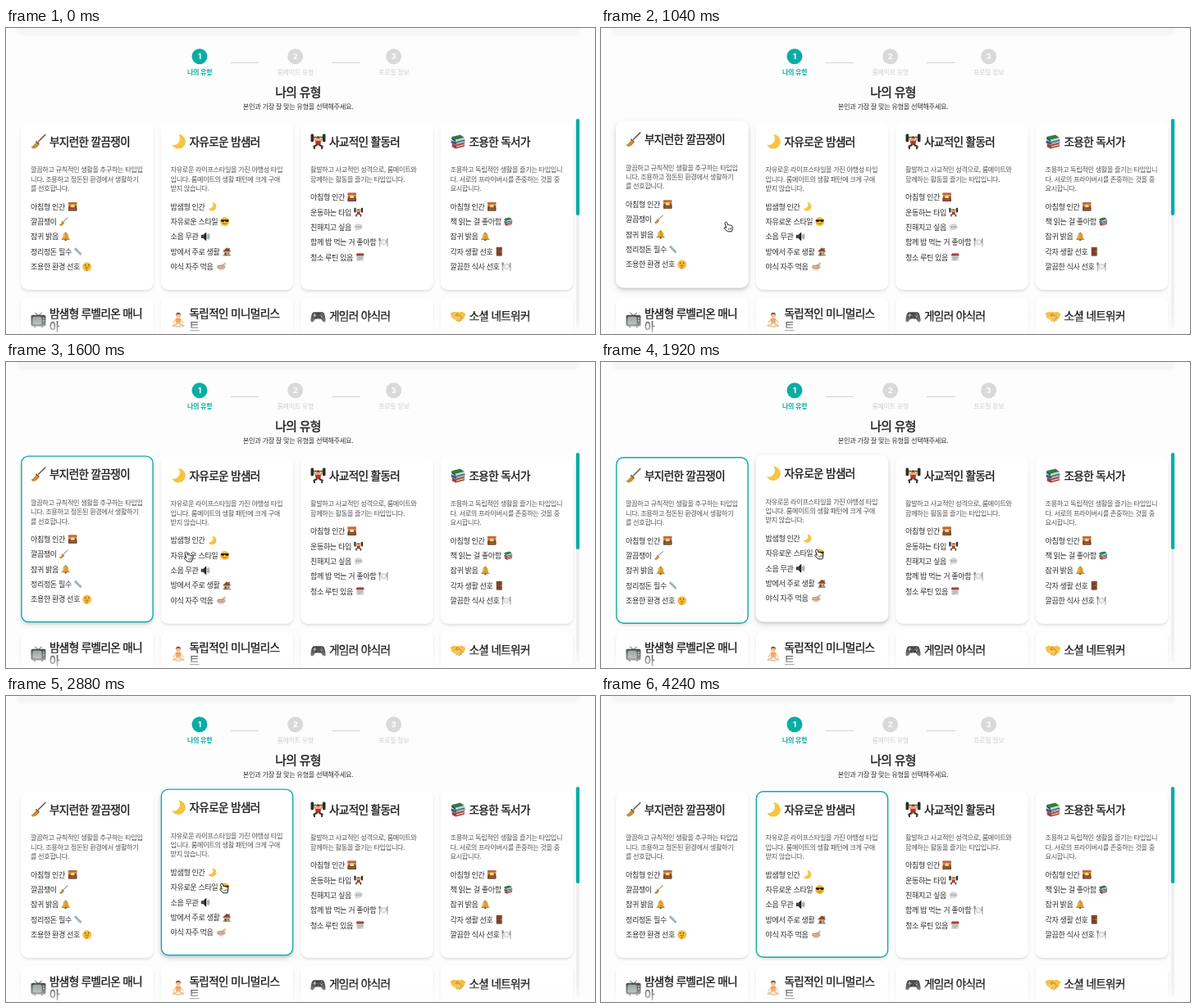
Recreate the animation shown at these times as an HTML page. Size 718 by 374 pixels, loop 4320 ms.

```html
<!DOCTYPE html>
<html lang="ko">
<head>
<meta charset="utf-8">
<style>
  html, body { margin: 0; width: 100%; height: 100%; overflow: hidden; background: #fdfdfd; }
  svg { display: block; width: 718px; height: 374px; }
  text {
    font-family: "Noto Sans CJK KR", "Noto Sans CJK", "Noto Sans CJK JP", sans-serif;
    letter-spacing: -0.045em;
    white-space: pre;
  }
  .title { font-size: 13.55px; font-weight: 500; fill: #1f1f1f; stroke: #1f1f1f; stroke-width: .4; }
  .desc { font-size: 8.2px; fill: #555; }
  .item { font-size: 9.1px; fill: #2e2e2e; }
  .head { font-size: 14.8px; font-weight: 500; fill: #1f1f1f; stroke: #1f1f1f; stroke-width: .4; }
  .sub { font-size: 8.25px; fill: #333; }
  .step { font-size: 8.1px; fill: #cfcfcf; }
  .step.on { fill: #0aada5; font-weight: 700; }
  .num { font: 700 9.5px Inter, sans-serif; fill: #fff; letter-spacing: 0; }
  .mid { text-anchor: middle; }
  .bar { filter: blur(.8px); }
  .base { fill: #fff; filter: drop-shadow(0 2px 1.7px rgba(0,0,0,.11)); }
  .raise { fill: #fff; filter: drop-shadow(0 3px 3.5px rgba(0,0,0,.13)); opacity: 0; }
  .ring { fill: none; stroke: #0aada5; stroke-width: 1.4; opacity: 0; }
</style>
</head>
<body>
<svg id="stage" viewBox="0 0 718 374"></svg>
<script>
const TEAL = '#0aada5';
const LOOP = 4320, TICK = 80;

// Icons live in a 20 x 20 box.
const face = '<circle cx="10" cy="10" r="9.4" fill="#f6bd3a"/>';
const box = (x, y, w, h, fill, r = 0) =>
  `<rect x="${x}" y="${y}" width="${w}" height="${h}" rx="${r}" fill="${fill}"/>`;
const dot = (x, y, r, fill) => `<circle cx="${x}" cy="${y}" r="${r}" fill="${fill}"/>`;
const fill = (d, c) => `<path d="${d}" fill="${c}"/>`;
const line = (d, c, w = 1.5) =>
  `<path d="${d}" fill="none" stroke="${c}" stroke-width="${w}" stroke-linecap="round" stroke-linejoin="round"/>`;

const ICONS = {
  broom: line('M18.5 1.5L10 10', '#6b574b', 1.6) +
    fill('M7.5 9L11.5 12.8Q9.5 18 3 19.2L.8 16.6Q6 14 7.5 9Z', '#d2a047') +
    line('M7.2 10L10.4 13', '#7c4a34', 1.3) + line('M3 17.5L7.5 13M5.5 18L9 14.5', '#94692a', .8),
  moon: fill('M10 1A9 9 0 1 1 2 14A8 8 0 0 0 10 1Z', '#f5c542'),
  lift: line('M2 4.5H18', '#444', 1.2) + box(.8, .5, 3.6, 10, '#2b2b2b', 1.4) + box(15.6, .5, 3.6, 10, '#2b2b2b', 1.4) +
    line('M7.5 10.5L5.2 6M12.5 10.5L14.8 6', '#d99a5e', 2.2) + dot(10, 6.2, 2.8, '#e3a86e') +
    fill('M7.2 5.6Q10 1.5 12.8 5.6Z', '#4a3023') + box(6.8, 9, 6.4, 5.5, '#b5342f', 1.5) +
    line('M8 14.5L4.8 16L5.4 18.5M12 14.5L15.2 16L14.6 18.5', '#40302c', 2.2),
  books: fill('M2 4L13 1.5L18 5L7 8Z', '#2f7a4c') + fill('M2 4L7 8V10.5L2 7Z', '#1f5636') +
    fill('M7 8L18 5V7.5L7 10.5Z', '#c9d2bd') + fill('M1.5 8.5L7 10.5L18.5 7.5V11L7 14L1.5 12Z', '#315f8e') +
    fill('M8 11.8L18 9.3V10.4L8 12.9Z', '#dcd8c8') +
    fill('M2.5 12.5L7 14.2L18 11.5V16L7 19L2.5 16.5Z', '#ad3a33') + fill('M8 15.8L17.5 13.4V14.6L8 17.1Z', '#e4dccb'),
  tv: line('M6 1L10 4.5L14 1', '#444', 1) + box(.8, 3.5, 18.4, 14.2, '#454547', 2) +
    box(2.8, 5.6, 11.4, 10, '#8f9d9b', 2) + dot(16.6, 7.6, 1, '#bbb') + dot(16.6, 10.8, 1, '#bbb') +
    line('M5 18.5H6M14 18.5H15', '#333', 1.6),
  calm: dot(10, 4, 3, '#f0bd83') + fill('M7 4Q7 .5 10 .5T13 4L11.5 2.5H8.5Z', '#73503a') +
    line('M7.5 8.5L4 13.5M12.5 8.5L16 13.5', '#f0bd83', 1.8) + box(7, 7.5, 6, 7, '#e0903f', 1.6) +
    line('M8 15L3.5 17L12 18.3M12 15L16.5 17L9 18.3', '#dba05e', 2.2),
  pad: fill('M5 4.5H15Q17.5 4.5 18.5 9.5Q20.5 17 17.6 17.2Q16 17.2 13.5 13H6.5Q4 17.2 2.4 17.2Q-.5 17 1.5 9.5Q2.5 4.5 5 4.5Z', '#46474b') +
    line('M4 8.5H7.4M5.7 6.8V10.2', '#bfc1c6', 1.2) + dot(14.3, 6.8, .9, '#58a86b') + dot(16, 8.5, .9, '#d65a50') +
    dot(12.6, 8.5, .9, '#5686d2') + dot(14.3, 10.2, .9, '#dfba4b') + dot(7.8, 11.6, 1.5, '#26272a') + dot(12.2, 11.6, 1.5, '#26272a'),
  shake: fill('M.5 6L4.5 4L10 5L15.5 4L19.5 7L17.5 12.5L12 17Q9.5 18 7.5 15.5L2 11.5Z', '#f6bf40') +
    line('M10 5.2L7 9Q8.5 10.5 11 8L16 12.3M8 15.5L9.7 13.6M11.5 16.5L12.4 14.2M14 15L13.4 12.2', '#b87d1e', 1),
  dawn: box(1, 1, 18, 18, '#e58a42', 1) + box(1, 1, 18, 4, '#b5694a', 1) +
    dot(10, 9.5, 3.8, '#ffdc6a') + box(1, 12, 18, 7, '#6d4335', .8) +
    box(2, 9, 3.2, 5, '#7a4a38') + box(14.8, 8, 3.2, 6, '#7a4a38') + line('M4 15.5H16', '#d68d42', 1.2),
  bell: fill('M10 2Q15.5 2.5 15.5 9Q15.8 13 18.2 16H1.8Q4.2 13 4.5 9Q4.5 2.5 10 2Z', '#d99f2e') +
    dot(10, 17.3, 2, '#6d4a18') + dot(10, 2.2, 1.4, '#a87522') + line('M1.8 16H18.2', '#94681f', 1.2) +
    line('M7.3 6Q6.8 9 6 12.5', '#ffe08a', 1.2),
  ruler: fill('M1.5 5L5 1.5L18.5 15L15 18.5Z', '#a9bccb') +
    line('M6 2.8L4.6 4.2M8.5 5.3L7.1 6.7M11 7.8L9.6 9.2M13.5 10.3L12.1 11.7M16 12.8L14.6 14.2', '#5f7382', .9),
  hush: face + dot(6.6, 7, 1.4, '#5b3a1c') + dot(13.4, 7, 1.4, '#5b3a1c') +
    line('M7 12Q10 13.5 13 12', '#7b4a1e', 1.4) + line('M10 10.8V17', '#d98f25', 2.4) + dot(9, 17.2, 2.6, '#e09b30'),
  cool: face + fill('M1.5 6H18.5Q18.5 11 14.5 11Q11.5 11 10 7.6Q8.5 11 5.5 11Q1.5 11 1.5 6Z', '#26221f') +
    line('M6 13.6Q10 17 14 13.6', '#7b4a1e', 1.2),
  sound: fill('M1.5 6.5H6L12.5 1V19L6 13.5H1.5Z', '#3d4044') + fill('M9 4L12.5 1V19L9 16Z', '#1d1f22') +
    line('M15 6.5Q17 10 15 13.5M17.5 4.5Q20 10 17.5 15.5', '#55595e', 1.4),
  house: box(3.5, 9, 13, 9.5, '#dcc39d') + fill('M10 1.5L19 10.2H1Z', '#94432f') + box(13.5, 2.5, 2.4, 4, '#7a3a2b') +
    box(5.5, 12, 3.6, 6.5, '#6a3f28') + box(11, 12, 4, 3.6, '#5f8eae') + box(2, 17, 16, 1.8, '#5f8442'),
  bowl: line('M10 8L19 2M11.5 8.5L19.5 4.5', '#a0633d', 1) + '<ellipse cx="10" cy="9.5" rx="9" ry="3" fill="#d9a95c"/>' +
    fill('M1 9.5H19Q18 16 13 18H7Q2 16 1 9.5Z', '#d8d4cf') + line('M2 12Q10 15 18 12', '#b5483d', 1.2) +
    line('M4 9Q7 7.5 10 9T15 9', '#a5692c', .9),
  talk: fill('M10 2.5C15 2.5 18.8 5.4 18.8 9.2S15 16 10 16Q8.5 16 7 15.6Q5.5 17.6 2.6 17.8Q4 16 3.8 14Q1.2 12 1.2 9.2C1.2 5.4 5 2.5 10 2.5Z', '#d3d7da') +
    dot(6, 9.3, 1.2, '#5c6268') + dot(10, 9.3, 1.2, '#5c6268') + dot(14, 9.3, 1.2, '#5c6268'),
  plate: dot(10, 10, 6.5, '#d2d6d9') + dot(10, 10, 4.2, '#f0f1f2') +
    line('M2 2V18.5M.6 2V6.5H3.4V2M18.2 18.5V2Q16.2 5 16.6 10H18', '#6d7177', 1.2),
  dates: box(2, 2.5, 16, 15.5, '#dcddde', 1.5) + box(2, 2.5, 16, 4.5, '#b5443d', 1.2) +
    line('M5 10H15M5 12.7H15M5 15.4H11', '#888d92', 1.1) + line('M5 1.5V4M8.3 1.5V4M11.6 1.5V4M15 1.5V4', '#444', 1),
  door: box(4, 1, 12, 18, '#5e331d', .6) + box(5.3, 2.3, 9.4, 16.7, '#935431') +
    box(6.8, 4, 6.4, 5, '#733e23') + box(6.8, 11, 6.4, 6, '#733e23') + dot(13.8, 10, .9, '#e8bf4f')
};

const icon = (name, x, y, size) =>
  `<g transform="translate(${x - size / 2} ${y - size / 2}) scale(${size / 20})">${ICONS[name]}</g>`;
const text = (cls, x, y, s) => `<text class="${cls}" x="${x}" y="${y}">${s}</text>`;

// Item: label, icon, icon centre measured from the card's left edge.
const CARDS = [
  { icon: 'broom', title: '부지런한 깔끔쟁이',
    desc: ['깔끔하고 규칙적인 생활을 추구하는 타입입', '니다. 조용하고 정돈된 환경에서 생활하기', '를 선호합니다.'],
    items: [['아침형 인간', 'dawn', 63], ['깔끔쟁이', 'broom', 52], ['잠귀 밝음', 'bell', 54.5],
      ['정리정돈 필수', 'ruler', 69.5], ['조용한 환경 선호', 'hush', 80.5]] },
  { icon: 'moon', title: '자유로운 밤샘러',
    desc: ['자유로운 라이프스타일을 가진 야행성 타입', '입니다. 룸메이트의 생활 패턴에 크게 구애', '받지 않습니다.'],
    items: [['밤샘형 인간', 'moon', 62.5], ['자유로운 스타일', 'cool', 78], ['소음 무관', 'sound', 54],
      ['방에서 주로 생활', 'house', 80.5], ['야식 자주 먹음', 'bowl', 73.5]] },
  { icon: 'lift', title: '사교적인 활동러',
    desc: ['활발하고 사교적인 성격으로, 룸메이트와', '함께하는 활동을 즐기는 타입입니다.'],
    items: [['아침형 인간', 'dawn', 62.5], ['운동하는 타입', 'lift', 70.5], ['친해지고 싶음', 'talk', 70.5],
      ['함께 밥 먹는 거 좋아함', 'plate', 101], ['청소 루틴 있음', 'dates', 72.5]] },
  { icon: 'books', title: '조용한 독서가',
    desc: ['조용하고 독립적인 생활을 즐기는 타입입니', '다. 서로의 프라이버시를 존중하는 것을 중', '요시합니다.'],
    items: [['아침형 인간', 'dawn', 62.5], ['책 읽는 걸 좋아함', 'books', 82.5], ['잠귀 밝음', 'bell', 54.5],
      ['각자 생활 선호', 'door', 71.5], ['깔끔한 식사 선호', 'plate', 80.5]] }
];
const MORE = [
  ['tv', ['밤샘형 루벨리온 매니', '아']],
  ['calm', ['독립적인 미니멀리스', '트']],
  ['pad', ['게임러 야식러']],
  ['shake', ['소셜 네트워커']]
];

const colX = i => 18.2 + i * 170.5;
const panel = cls => `<rect class="${cls}" width="161.6" height="204" rx="9"/>`;

function card(c, i) {
  const first = 102 - (3 - c.desc.length) * 11.4;
  return `<g class="card" transform="translate(${colX(i)} 116)">` + panel('base') + panel('raise') +
    '<rect class="ring" x=".7" y=".7" width="160.2" height="202.6" rx="8.5"/>' +
    icon(c.icon, 21.3, 22.8, 19.5) + text('title', 34.8, 27.8, c.title) +
    c.desc.map((s, k) => text('desc', 11.8, 60.3 + k * 11.4, s)).join('') +
    c.items.map(([s, name, x], k) => {
      const y = first + k * 18.35;
      return text('item', 11.8, y + 3.6, s) + icon(name, x, y + .2, 11.6);
    }).join('') + '</g>';
}

function nextCard([name, lines], i) {
  const two = lines.length > 1;
  return `<g transform="translate(${colX(i)} 329)">` + panel('base') +
    icon(name, 21.3, two ? 28 : 23.5, 19.5) +
    lines.map((s, k) => text('title', 34.8, (two ? 25 : 28) + k * 16.4, s)).join('') + '</g>';
}

const steps = [[236, '나의 유형'], [352.7, '룸메이트 유형'], [472.6, '프로필 정보']].map(([x, s], i) =>
  dot(x, 34.8, 9.5, i ? '#d9d9d9' : TEAL) + text('num mid', x, 38.3, i + 1) +
  text('step mid' + (i ? '' : ' on'), x, 57.3, s)).join('');

const stage = document.getElementById('stage');
stage.innerHTML = `
  <defs>
    <linearGradient id="fade" x1="0" y1="0" x2="0" y2="1">
      <stop offset="0" stop-color="#fdfdfd" stop-opacity="0"/>
      <stop offset=".5" stop-color="#fdfdfd" stop-opacity=".4"/>
      <stop offset="1" stop-color="#fdfdfd" stop-opacity=".8"/>
    </linearGradient>
  </defs>
  ${box(0, 0, 718, 374, '#fdfdfd')}
  <g class="bar">${box(13, -12, 687, 21, '#f6f6f6', 6)}</g>
  ${box(274, 42, 34, 1, '#d4d4d4')}${box(397, 42, 35, 1, '#d4d4d4')}
  ${steps}
  ${text('head mid', 356, 83.6, '나의 유형')}
  ${text('sub mid', 356, 98.6, '본인과 가장 잘 맞는 유형을 선택해주세요.')}
  ${box(694.85, 111, 4.3, 256, '#f0f0f0', 2.1)}
  ${MORE.map(nextCard).join('')}
  ${box(0, 350, 718, 24, 'url(#fade)')}
  ${CARDS.map(card).join('')}
  ${box(694.85, 111, 4.3, 118, TEAL, 2.1)}
  <g id="hand"><path d="M-3.6 -5.4Q-2.4 -6.6 -1.5 -5.2L-.4 -2.2Q.6 -3 1.4 -2Q2.5 -2.7 3.2 -1.6Q4.5 -2 4.9 -.6L5.3 2Q5.3 4 4.3 5.8H-.8Q-2 4 -4.6 2.2Q-5.4 1 -4 .6L-2.2 1.2L-3.9 -4Q-4.1 -4.9 -3.6 -5.4Z"
    fill="#fff" stroke="#222" stroke-width="1" stroke-linejoin="round"/>
    <path d="M.3 1.5L.8 4M2 1.2L2.4 3.8M3.6 1L3.8 3.4" stroke="#222" stroke-width=".6"/></g>`;

const cards = [...stage.querySelectorAll('.card')];
const hand = document.getElementById('hand');

// Rises from 0 to 1 between a and b, eased.
const ramp = (t, a, b) => {
  const p = Math.min(1, Math.max(0, (t - a) / (b - a)));
  return p * p * (3 - 2 * p);
};

// Each move: start time, end time, then the x and y it reaches.
const START = [150, 350];
const MOVES = [[80, 400, 155, 243], [1280, 1840, 265.5, 235], [2920, 3360, 268, 395]];

function pointer(t) {
  let [x, y] = START;
  for (const [a, b, nx, ny] of MOVES) {
    const p = ramp(t, a, b);
    x += (nx - x) * p;
    y += (ny - y) * p;
  }
  return [x, y];
}

const span = (t, a, b, c, d) => ramp(t, a, b) - ramp(t, c, d);

function pose(i, lift, ring) {
  const g = cards[i];
  g.setAttribute('transform', `translate(${colX(i)} ${116 - 2.6 * lift})`);
  g.querySelector('.raise').style.opacity = lift;
  g.querySelector('.ring').style.opacity = ring;
}

function draw(now) {
  const t = Math.floor((now % LOOP) / TICK) * TICK;
  pose(0, span(t, 200, 440, 1480, 1760), span(t, 1080, 1240, 2320, 2480));
  pose(1, span(t, 1560, 1840, 3140, 3420), ramp(t, 2320, 2480));
  const [x, y] = pointer(t);
  hand.setAttribute('transform', `translate(${x} ${y})`);
  hand.style.display = t > 80 && t < 3360 ? '' : 'none';
}

const begin = performance.now();
function frame() {
  draw(performance.now() - begin);
  requestAnimationFrame(frame);
}
draw(0);
requestAnimationFrame(frame);
</script>
</body>
</html>
```
